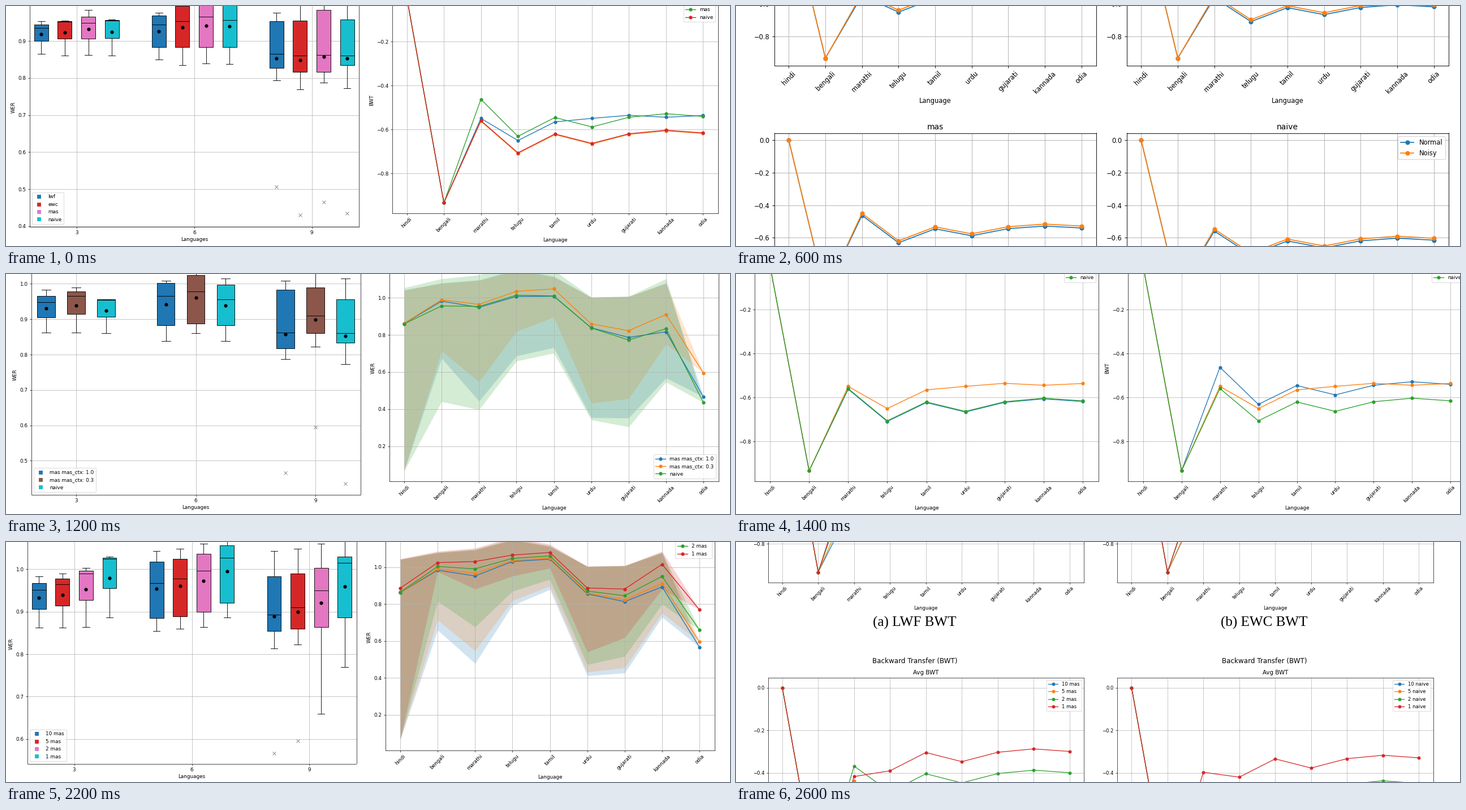
A matplotlib script for the animation above (2.8 s loop, 1280 px wide and 426 px high).

```python
import numpy as np
import matplotlib.pyplot as plt
from matplotlib.animation import FuncAnimation
from matplotlib.lines import Line2D
from matplotlib.ticker import MultipleLocator

W, H, DPI = 1280, 426, 64
LANGS = ["hindi", "bengali", "marathi", "telugu", "tamil",
         "urdu", "gujarati", "kannada", "odia"]
METHODS = ["lwf", "ewc", "mas", "naive"]
STEPS = [10, 5, 2, 1]
SCALED = ["font.size", "lines.linewidth", "lines.markersize",
          "lines.markeredgewidth", "axes.linewidth", "grid.linewidth",
          "axes.labelpad", "axes.titlepad", "patch.linewidth",
          "xtick.major.size", "xtick.major.width", "xtick.major.pad",
          "ytick.major.size", "ytick.major.width", "ytick.major.pad"]
BASE = {key: plt.rcParams[key] for key in SCALED}

fig = plt.figure(figsize=(W / DPI, H / DPI), dpi=DPI, facecolor="white")

# ---- word error rates: rows are average, lower and upper band ------------
CREST = np.array([.48, .9, 1.08, 1.7, 1.3, .04, .08, .9])


def run(avg, low, spread):
    return np.array([avg, [.067, *low, avg[-1]], [*(1 + spread * CREST), avg[-1]]])


def blend(a, b, start, end):
    """Mix two runs; the first language barely moves."""
    w = np.linspace(start, end, 9)
    w[0] *= .2
    return a + w * (b - a)


def family(a, b, near, far):
    return [a, blend(a, b, *near), blend(a, b, *far), b]


def ewc(drop):
    return NAIVE - drop * np.array([0, .1, .1, .2, .2, .2, .2, 1, .3])


def clean(avg):
    return avg - .003 - .04 * np.maximum(0, .86 - avg)


def noisy(avg):
    v = clean(avg)
    return v + .006 + 1.4 * np.maximum(0, v - 1) + .08 * np.maximum(0, .86 - v)


NAIVE = run([.860, .957, .954, 1.015, 1.011, .838, .773, .834, .435],
            [.44, .397, .659, .702, .342, .304, .546], .115)
FULL_MAS = run([.862, .983, .949, 1.008, 1.009, .839, .787, .817, .466],
               [.674, .443, .687, .732, .354, .352, .568], .09)
LWF = family(run([.865, .942, .920, .960, .957, .838, .766, .779, .410],
                 [.439, .368, .598, .641, .353, .288, .516], .035),
             run([.885, 1.014, 1.010, 1.037, 1.057, .902, .899, 1.004, .849],
                 [.995, .903, .98, .995, .607, .681, .955], .05),
             (.15, .22), (.55, .68))
MAS = family(run([.862, .983, .952, 1.030, 1.043, .855, .813, .893, .567],
                 [.659, .479, .793, .878, .412, .427, .729], .085),
             run([.886, 1.024, 1.030, 1.065, 1.079, .887, .881, 1.015, .769],
                 [.975, .881, .951, .994, .54, .619, .88], .095),
             (.18, .14), (.50, .46))
EWC = ewc(.017)
MAIN = [LWF[1], EWC, FULL_MAS, NAIVE]

# ---- backward transfer ---------------------------------------------------
START = [0, -.934]
BWT_NAIVE = np.array([*START, -.559, -.706, -.620, -.663, -.619, -.603, -.615])
BWT_LWF = np.array([*START, -.549, -.650, -.565, -.549, -.535, -.544, -.536])


def lifted(base, first, rest):
    """Raise a curve by one amount at the third language, another after it."""
    return base + np.r_[0, 0, first, np.full(6, rest)]


BWT = [BWT_LWF, lifted(BWT_NAIVE, -.003, -.003),
       lifted(BWT_NAIVE, .097, .075), BWT_NAIVE]


# ---- drawing -------------------------------------------------------------
def px(x):
    return (x + .5) / W


def py(y):
    return 1 - (y + .5) / H


def set_scale(k):
    plt.rcParams.update({key: v * k for key, v in BASE.items()})


def panel(area, ref, step, xlabel, ylabel, title=None):
    """Axes at a pixel box; ref = (value, y, value, y) fixes the y scale."""
    l, t, r, b = area
    ax = fig.add_axes([px(l), py(b), (r - l) / W, (b - t) / H])
    v0, p0, v1, p1 = ref
    ax.set_ylim(*(v0 + (p - p0) * (v1 - v0) / (p1 - p0) for p in (b, t)))
    ax.yaxis.set_major_locator(MultipleLocator(step))
    ax.set_xlabel(xlabel)
    if ylabel:
        ax.set_ylabel(ylabel)
    if title:
        ax.set_title(title)
    ax.grid(True)
    return ax


def box_panel(area, ref, rates, names=None, loc="lower left",
              ylabel="WER", title=None):
    ax = panel(area, ref, .1, "Languages", ylabel, title)
    n = len(rates)
    colors = plt.cm.tab10(np.linspace(0, 1, n))
    lw = plt.rcParams["patch.linewidth"]
    thin = dict(color="black", linewidth=lw)
    for j, (avg, c) in enumerate(zip(rates, colors)):
        ax.boxplot([avg[:m] for m in (3, 6, 9)],
                   positions=[1 + j + g * (n + 1) for g in range(3)],
                   widths=.6, patch_artist=True, showmeans=True, manage_ticks=False,
                   boxprops=dict(facecolor=c, edgecolor="black", linewidth=lw),
                   whiskerprops=thin, capprops=thin, medianprops=thin,
                   meanprops=dict(marker="o", markerfacecolor="black",
                                  markeredgecolor="black"),
                   flierprops=dict(marker="x", markeredgecolor="gray"))
    ax.set_xlim(.5, 3 * n + 2.5)
    ax.set_xticks([(n + 1) * (g + .5) for g in range(3)], ["3", "6", "9"])
    if names:
        marks = [Line2D([], [], marker="s", ls="", color=c) for c in colors]
        ax.legend(marks, names, loc=loc)


def line_panel(area, ref, series, names=None, loc="upper right",
               bands=(), ylabel="BWT", title=None):
    ax = panel(area, ref, .2, "Language", ylabel, title)
    x = np.arange(9)
    for j, y in enumerate(series):
        ax.plot(x, y, "o-", color=f"C{j}", label=names[j] if names else None)
    for j, (low, high) in enumerate(bands):
        ax.fill_between(x, low, high, color=f"C{j}", alpha=.2, linewidth=0)
    ax.set_xlim(-.4, 8.4)
    ax.set_xticks(x, LANGS, rotation=45)
    if names:
        ax.legend(loc=loc)


def pair(runs, names, x, top, base, lref, rref, loc="upper right"):
    set_scale(1)
    rates = [r[0] for r in runs]
    box_panel((x, top, x + 582, base), lref, rates, names)
    line_panel((x + 633, top, x + 1215, base - 24), rref, rates, names, loc,
               [r[1:] for r in runs], "WER")


def caption(x, y, text, size):
    fig.text(px(x), py(y), text, family="Liberation Serif",
             size=size * 72 / DPI, ha="center", va="baseline")


def counts(name):
    return [f"{n} {name}" for n in STEPS]


# ---- scenes --------------------------------------------------------------
def methods():
    set_scale(1)
    box_panel((41, -33, 623.5, 391), (.9, 61.5, .4, 390.5),
              [r[0] for r in MAIN], METHODS)
    line_panel((682, -33, 1258, 367), (-.2, 63, -.8, 296.7), BWT, METHODS)


def noise_grid(l0, high, low, series, bands):
    """Two by two line charts, the upper row cut by the stage."""
    set_scale(1.3)
    for j, name in enumerate(METHODS):
        l = l0 + 623 * (j % 2)
        top, base = ((-190, 105), (225, 520))[j // 2]
        line_panel((l, top, 636 + 623 * (j % 2), base),
                   (high, top + 13, low, base - 13), series[j],
                   ["Normal", "Noisy"] if name == "naive" else None,
                   bands=bands[j], ylabel=None, title=name)


def noise_lines():
    noise_grid(63, 1.2, 0, [(clean(r[0]), noisy(r[0])) for r in MAIN],
               [[r[1:]] * 2 for r in MAIN])


def noise_boxes():
    set_scale(1.665)
    for j, (name, r) in enumerate(zip(METHODS, MAIN)):
        l = 63 + 623 * (j % 2)
        top, base, y1 = ((-265, 138.5, -243), (225, 628, 266))[j // 2]
        box_panel((l, top, l + 573, base), (1, y1, .9, y1 + 61),
                  [clean(r[0]), noisy(r[0])],
                  ["Normal", "Noisy"] if name == "naive" else None,
                  "upper left", None, name)


def noise_bwt():
    noise_grid(67, 0, -.934, [(y, lifted(y, .012, .012)) for y in BWT], [()] * 4)


def lambda_pair(x, runs, name, values):
    names = [f"{name} lambda: {v}" for v in values] + ["naive"]
    pair(runs + [NAIVE], names, x, -39, 387,
         (.9, 57.5, .4, 384.5), (1, 39, .2, 301), "lower right")
    caption(315, 438, f"(a) {name.upper()} Box", 21)
    caption(948, 438, f"(b) {name.upper()} Shaded", 21)


def ewc_lambda():
    lambda_pair(36.5, [EWC, ewc(.021)], "ewc", ("5.0", "10.0"))


def lwf_lambda():
    lambda_pair(38, [LWF[1], LWF[0]], "lwf", ("1.0", "0.5"))


def mas_context():
    pair([FULL_MAS, MAS[1], NAIVE], ["mas mas_ctx: 1.0", "mas mas_ctx: 0.3", "naive"],
         44, -35, 391, (1, 17, .5, 331), (1, 42, .2, 305), "lower right")


def wide_bwt():
    set_scale(1)
    for l, r, j in ((32, 640, 1), (692, 1290, 2)):
        line_panel((l, -33, r, 367), (-.2, 63, -.8, 296.7),
                   [BWT[j], BWT_LWF, BWT_NAIVE], [METHODS[j], "lwf", "naive"])


def all_shaded():
    pair(MAIN, METHODS, 39, -32, 393, (1, 22.5, .4, 380), (1, 23, .2, 304))


def lwf_counts():
    pair(LWF, counts("lwf"), 39, -32, 393, (1, 22.5, .4, 380), (1, 23, .2, 304))


def ewc_counts():
    pair(family(EWC, LWF[-1], (.15, .22), (.55, .68)), counts("ewc"),
         39, -32, 393, (1, 48, .4, 368), (1, 44, .2, 306.5))


def mas_counts():
    pair(MAS, counts("mas"), 37, -32, 393, (1, 48, .6, 349.2), (1, 44, .2, 306.5))


def naive_counts():
    pair(family(NAIVE, LWF[-1], (.15, .22), (.55, .68)), counts("naive"),
         40, -32, 393, (1, 48, .4, 368), (1, 44, .2, 306.5))


def backward_transfer():
    set_scale(.957)
    columns = [
        (56, "mas", "(a) LWF BWT", BWT[0], (-.05, 0, .10, .14),
         ((.10, .11), (.12, .15), (.19, .215), (.141, .315))),
        (673.5, "naive", "(b) EWC BWT", BWT[1], (-.01, 0, .12, .14),
         ((0, -.03), (0, 0), (.08, .165), (.161, .285))),
    ]
    for l, name, text, base, lifts, steps in columns:
        line_panel((l, -316, l + 558.5, 71), (0, -299, -.8, 2.5),
                   [lifted(base, d, d) for d in lifts])
        line_panel((l, 240, l + 558.5, 627), (0, 258, -.4, 409),
                   [lifted(BWT_NAIVE, *s) for s in steps],
                   counts(name), title="Avg BWT")
        fig.text(px(l + 259.8), py(211.3), "Backward Transfer (BWT)",
                 size=11.85 * 72 / DPI, ha="center", va="center")
        caption(l + 259.5, 149, text, 25.1)


SCENES = [methods, noise_lines, noise_boxes, noise_bwt, ewc_lambda, lwf_lambda,
          mas_context, wide_bwt, all_shaded, lwf_counts, ewc_counts, mas_counts,
          naive_counts, backward_transfer]


def update(i):
    fig.clear()
    SCENES[i]()
    return []


anim = FuncAnimation(fig, update, frames=len(SCENES), init_func=lambda: [],
                     interval=200, repeat=True, repeat_delay=0, blit=False)
plt.show()
```
